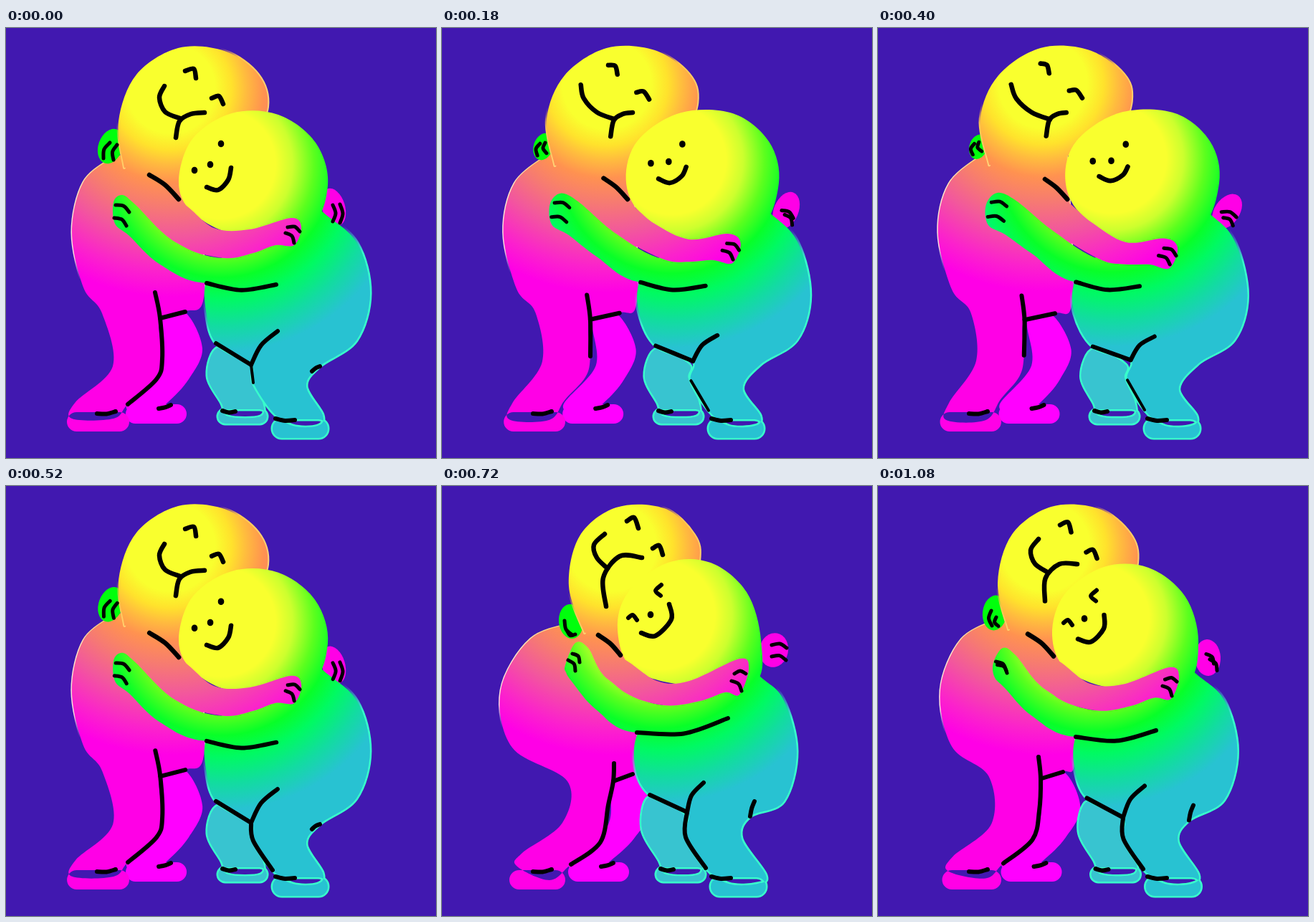
An HTML page with a canvas for the animation above (1140 ms loop, 600 by 600 pixels).

```html
<!DOCTYPE html>
<html lang="en">
<head>
<meta charset="utf-8">
<title>Hug</title>
<style>
html, body { margin: 0; width: 100%; height: 100%; overflow: hidden; background: #4118b0; }
canvas { display: block; width: 100vw; height: 100vh; }
</style>
</head>
<body>
<canvas id="stage" width="600" height="600"></canvas>
<script>
const ctx = document.getElementById('stage').getContext('2d');
const LOOP = 1140;

// Start time and closeness of the hug: 0 apart, 1 resting, 2 squeezing.
const TIMELINE = [[0, 1], [120, 0.68], [180, 0.42], [240, 0], [400, 0.25], [460, 0.68],
  [520, 1.01], [580, 1.5], [640, 1.75], [720, 2], [960, 1.75], [1080, 1.5]];

// Returns a function of closeness that blends three key outlines.
function part(...keys) {
  const [apart, rest, squeeze] = keys.map(k => k.split(' ').map(Number));
  return t => rest.map((v, i) => t < 1
    ? apart[i] + (v - apart[i]) * t
    : v + (squeeze[i] - v) * (t - 1));
}

const glow = part('230 75 335 180', '230 85 300 190', '237 85 305 180');

const pinkBody = part(
  '145 175 96 218 81 285 101 365 128 397 133 462 100 523 97 548 150 548 172 515 193 485 199 455 201 408 246 399 270 376 262 150',
  '150 180 108 215 92 285 108 362 134 398 149 472 97 522 92 545 150 545 170 525 210 490 218 462 215 405 250 396 277 365 262 150',
  '190 190 124 213 82 285 98 365 175 412 168 470 112 512 104 530 150 550 180 528 221 497 232 445 239 412 266 402 273 380 262 150');

const greenBody = part(
  '305 320 273 355 272 400 302 446 356 461 349 490 372 532 400 555 438 555 446 542 420 505 450 467 500 435 518 375 502 300 472 262 380 200',
  '310 310 280 352 279 395 293 440 342 470 345 495 372 536 400 555 435 555 442 540 419 500 438 472 489 436 508 370 490 300 440 255 380 200',
  '305 310 272 348 270 395 290 431 342 455 340 490 368 533 400 555 440 555 452 543 418 492 430 461 477 440 495 370 476 297 440 262 380 200');

const pinkHead = part(
  '152 190 138 125 163 67 222 28 290 30 340 64 350 100 330 170',
  '165 195 157 130 182 65 240 28 305 32 352 65 365 110 340 170',
  '199 205 177 140 192 70 243 30 310 31 352 68 359 105 340 170');

const greenHead = part(
  '268 208 283 158 345 118 425 118 474 158 485 215 455 285 365 311 290 260',
  '241 215 260 155 315 119 380 121 432 160 449 220 420 280 320 287 260 257',
  '245 200 260 148 315 107 375 107 425 148 445 215 435 275 340 278 266 255');

const greenArm = part(
  '151 248 168 229 198 240 250 280 315 325 400 340 400 352 275 354 215 310 180 288 154 275',
  '150 243 162 233 180 246 235 298 305 321 400 300 400 340 280 356 215 330 172 290 152 273',
  '172 250 186 219 204 226 232 270 310 306 410 285 410 325 272 344 215 312 182 274 173 260');

const pinkArm = part(
  '258 235 300 268 348 305 400 303 420 316 408 346 380 339 345 335 315 325 262 288 235 260',
  '245 245 290 279 340 281 398 265 412 278 402 303 376 303 345 314 305 321 250 306 225 272',
  '250 240 300 272 345 272 415 241 428 255 415 291 395 288 360 300 310 306 255 288 215 245');

// Far fists: centre, radii, turn.
const greenFist = part('138 166 11 15 .3', '146 165 17 25 .35', '180 189 17 24 -.1');
const pinkFist = part('497 258 18 27 .9', '457 250 16 27 -.3', '463 229 20 24 .2');

// Far legs: one outline each, with foot shift and shear.
const farLeg = '216 405 250 397 274 447 255 490 226 522 200 540 168 527 217 470'.split(' ').map(Number);
const backLeg = '296 446 281 485 301 524 310 542 355 542 358 522 342 488 342 468'.split(' ').map(Number);
const farShift = part('2 -12 3', '0 0 0', '9 12 6');
const backShift = part('0 9 4', '0 0 0', '3 -14 -18');

const brows = [
  part('219 46 227 50 230 61', '250 60 262 57 265 70', '258 49 268 44 274 59'),
  part('260 84 270 84 279 95', '287 98 297 95 303 106', '294 87 303 83 308 96')];
const mouth = [
  part('174 78 186 99 212 118 239 128', '221 81 214 97 222 117 243 126', '227 67 212 82 216 100 231 115'),
  part('234 150 238 128 248 120 258 118', '237 153 242 130 258 120 277 118', '229 168 225 128 248 98 279 100')];
const neck = part('244 213 258 224 272 239', '200 205 222 219 241 239', '218 208 235 220 249 236');
const smile = part('318 202 334 209 352 203 360 193', '280 222 296 226 310 212 314 195', '278 205 298 209 320 186 317 165');
const eyes = part('361 162 312 181 339 183', '300 161 263 198 285 190', '302 146 265 184 291 179');

// Pairs of finger gaps, each from end to end.
const fingers = [
  part('131 175 131 162 143 168 136 158', '136 182 145 160 150 184 155 163', '182 208 171 188 186 207 175 203'),
  part('487 260 515 262 487 271 505 277', '456 247 456 270 466 246 466 272', '460 222 481 226 460 238 480 243'),
  part('160 242 182 246 154 263 178 267', '153 247 172 257 151 265 168 276', '176 243 186 258 182 234 192 246'),
  part('401 317 418 329 392 328 409 340', '393 278 410 284 390 286 402 300', '408 262 424 262 404 272 418 286')];

// Ends of the leg, thigh and armpit creases.
const ends = part('198 375 388 433 361 361', '208 369 379 423 377 358', '240 387 365 414 399 324');

const PINK = [[0, '#f9ff2e'], [62, '#f9ff2e'], [85, '#ffe22c'], [105, '#ffbc3e'], [130, '#ff9250'],
  [165, '#f67a72'], [205, '#f2589c'], [255, '#fb22cc'], [290, '#ff00e6']];
const GREEN = [[0, '#f9ff2e'], [76, '#f9ff2e'], [100, '#ccff2e'], [130, '#5cff1e'], [158, '#08ff28'],
  [188, '#00fa62'], [225, '#12dca0'], [262, '#28c2d2']];
const PINK_RIM = [[0, '#ffb04000'], [88, '#ffb04000'], [105, '#ffc850'], [200, '#ffe8c8'],
  [270, '#ffe0e0'], [295, '#ffc0f000']];
const GREEN_RIM = [[0, '#38ffcc00'], [190, '#38ffcc00'], [235, '#38ffcc']];

function radial(x, y, stops) {
  const reach = stops[stops.length - 1][0];
  const g = ctx.createRadialGradient(x, y, 0, x, y, reach);
  for (const [r, color] of stops) g.addColorStop(r / reach, color);
  return g;
}

// Smooth curve through all the points.
function curve(p, closed) {
  const n = p.length / 2;
  const at = (i, k) => p[2 * (closed ? (i + n) % n : Math.max(0, Math.min(n - 1, i))) + k];
  const path = new Path2D();
  path.moveTo(p[0], p[1]);
  for (let i = 0; i < (closed ? n : n - 1); i++) {
    const [x, y] = [0, 1].map(k => [
      at(i, k) + (at(i + 1, k) - at(i - 1, k)) / 6,
      at(i + 1, k) - (at(i + 2, k) - at(i, k)) / 6,
      at(i + 1, k)]);
    path.bezierCurveTo(x[0], y[0], x[1], y[1], x[2], y[2]);
  }
  if (closed) path.closePath();
  return path;
}

function withFoot(path, left, right, top, bottom) {
  path.roundRect(left, top, right - left, bottom - top, (bottom - top) / 2);
  return path;
}

function shear(points, [base, dx, dy]) {
  return points.map((v, i) => {
    const k = Math.max(0, 530 - points[i | 1]) / 125;
    return i % 2 ? v + dy * k : v + base + dx * k;
  });
}

function shape(path, fill, rim, width) {
  if (rim) {
    ctx.strokeStyle = rim;
    ctx.lineWidth = width;
    ctx.stroke(path);
  }
  ctx.fillStyle = fill;
  ctx.fill(path);
}

function fist([x, y, rx, ry, turn], fill) {
  const path = new Path2D();
  path.ellipse(x, y, rx, ry, turn, 0, 2 * Math.PI);
  shape(path, fill);
}

function ink(points, width = 6) {
  ctx.strokeStyle = '#000';
  ctx.lineWidth = width;
  ctx.stroke(curve(points, false));
}

// Line from end to end, bowed sideways.
function bow(x1, y1, x2, y2, bulge, width) {
  const d = Math.hypot(x2 - x1, y2 - y1) || 1;
  ink([x1, y1, (x1 + x2) / 2 + (y2 - y1) / d * bulge, (y1 + y2) / 2 - (x2 - x1) / d * bulge, x2, y2], width);
}

function drawCreases(t, pink, green, arm, far, back) {
  const span = (p, from, to) => p.slice(2 * from, 2 * to + 2);
  const [legX, legY, thighX, thighY, pitX, pitY] = ends(t);
  ink([...span(pink, t < 1 ? 11 : 9, 12), legX, legY]);
  ink(span(pink, 12, 13));
  ink(span(green, 3, 4));
  ink(t < 0.5 ? span(green, 5, 6) : span(green, 4, t > 1 ? 6 : 5), t > 1 ? 6 : 4);
  bow(...span(green, 4, 4), thighX, thighY, 6);
  const [armX, armY] = span(arm, 7, 7);
  bow(armX, armY, pitX, pitY, -0.09 * Math.hypot(pitX - armX, pitY - armY));
  const [kneeX, kneeY] = span(green, 11, 11);
  if (t > 1.2) bow(kneeX, kneeY, kneeX + 6, kneeY - 21, 1);
  else if (t > 0.5) bow(kneeX, kneeY, kneeX - 11, kneeY + 7, -1);
  bow(127, 538, 153, 535, -2);
  bow(213 + far, 531, 230 + far, 526, -1);
  bow(302 + back, 534, 320 + back, 535, -2);
  bow(376, 545, 403, 547, -2);
}

function drawFace(t) {
  for (const line of [...brows, ...mouth, neck, smile]) ink(line(t), 6.5);
  const [rx, ry, lx, ly, nx, ny] = eyes(t);
  const dot = (x, y) => ink([x, y, x, y + 1], 8.5);
  dot(nx, ny);
  if (t > 1.2) {
    ink([rx + 4, ry - 8, rx - 4, ry, rx + 3, ry + 7]);
    ink([lx - 5, ly, lx + 1, ly - 4, lx + 7, ly + 3]);
  } else {
    dot(rx, ry);
    dot(lx, ly);
  }
}

function draw(t) {
  const [px, py, gx, gy] = glow(t);
  const pink = radial(px, py, PINK), green = radial(gx, gy, GREEN);
  const pinkRim = radial(px, py, PINK_RIM), greenRim = radial(gx, gy, GREEN_RIM);
  const pinkLine = pinkBody(t), greenLine = greenBody(t), arm = greenArm(t);
  const farMove = farShift(t), backMove = backShift(t);
  const far = farMove[0], back = backMove[0];

  ctx.fillStyle = '#4118b0';
  ctx.fillRect(0, 0, 600, 600);
  shape(withFoot(curve(shear(farLeg, farMove), true), 167 + far, 252 + far, 525, 552), '#ff00ff');
  shape(withFoot(curve(pinkLine, false), 85 + far, 172, 536, 563), pink, pinkRim, 3);
  fist(greenFist(t), '#00ff0c');
  shape(curve(pinkHead(t), false), pink, pinkRim, 4);
  fist(pinkFist(t), '#ff00e6');
  shape(withFoot(curve(shear(backLeg, backMove), true), 296 + back, 364 + back, 532, 552),
    '#38c4d0', greenRim, 5);
  shape(withFoot(curve(greenLine, false), 372 + back, 449 + back, 546, 572), green, greenRim, 5);
  shape(curve(greenHead(t), true), green);
  shape(curve(arm, true), green);
  shape(curve(pinkArm(t), true), pink);

  drawCreases(t, pinkLine, greenLine, arm, far, back);
  for (const pair of fingers) {
    const p = pair(t);
    bow(...p.slice(0, 4), 4, 5);
    bow(...p.slice(4), 4, 5);
  }
  drawFace(t);
}

ctx.lineCap = ctx.lineJoin = 'round';
let shown;
function tick() {
  const now = performance.now() % LOOP;
  const t = TIMELINE.findLast(([start]) => start <= now)[1];
  if (t !== shown) draw(shown = t);
  requestAnimationFrame(tick);
}
tick();
</script>
</body>
</html>
```
